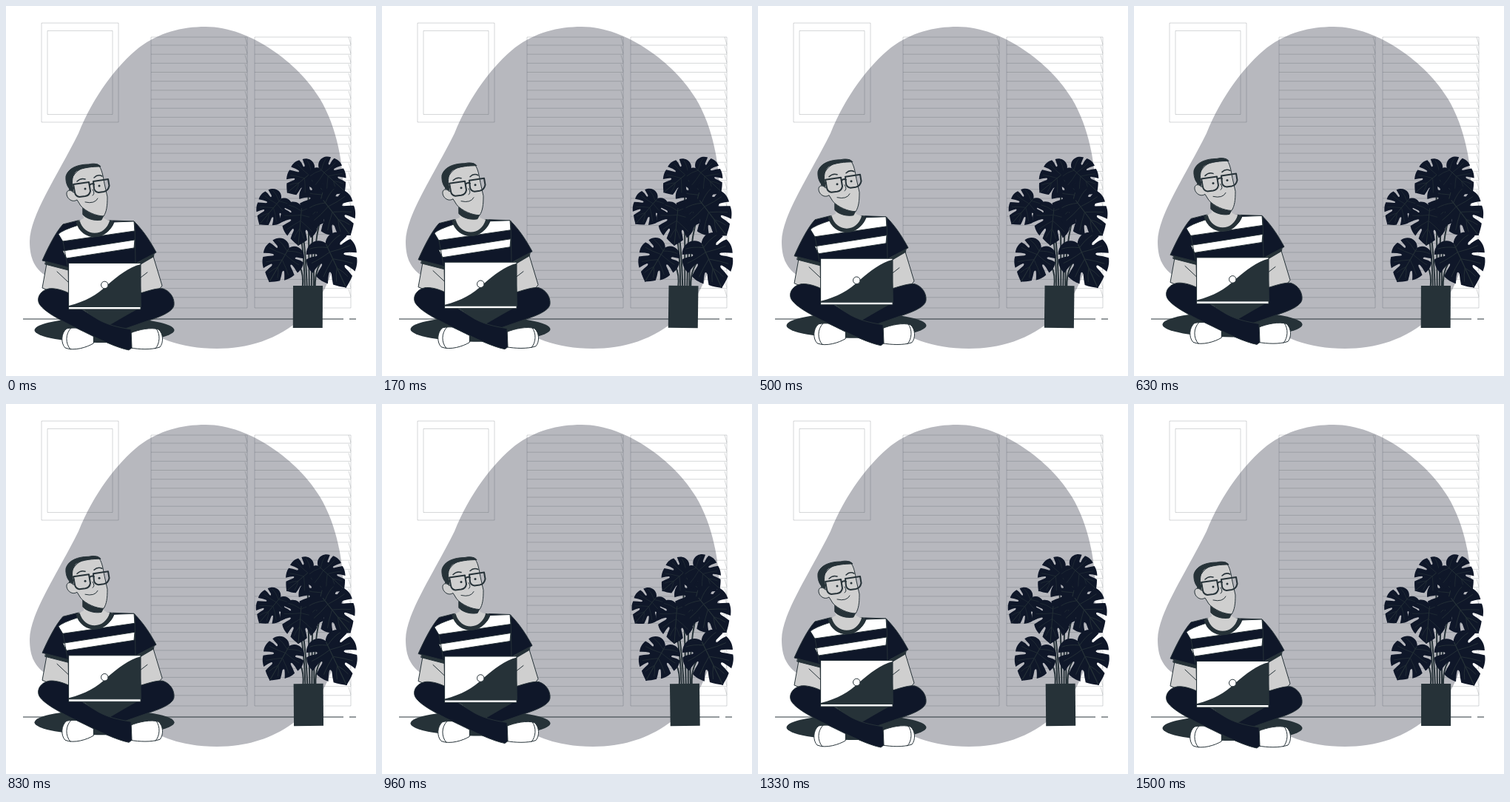
Write an HTML page that moves like this. It is 500 px wide and 500 px high and loops after 1.54 s.

```html
<!DOCTYPE html>
<html lang="en">
<head>
<meta charset="utf-8">
<title>Working at home</title>
<style>
  html, body { margin: 0; width: 100%; height: 100%; overflow: hidden; background: #fff; }
  svg { display: block; width: 100%; height: 100%; }
  .thin { fill: none; stroke: #263238; stroke-opacity: .19; }
  .navy { fill: #0f1729; }
  .dark { fill: #263238; }
  .skin { fill: #cfcfcf; }
  .white { fill: #fff; }
  .line { fill: none; }
  #man { stroke: #263238; stroke-linejoin: round; stroke-linecap: round; }
</style>
</head>
<body>
<svg viewBox="0 0 500 500">
  <defs>
    <g id="half">
      <path class="navy" d="M-1-24C6-40 28-40 36-22Q28-19 22-17Q18-13 23-13Q32-16 39-15C43-6 42 2 39 9Q29 3 22 1Q17 1 21 5Q29 10 36 16C34 24 29 30 24 35Q19 25 15 20Q12 18 12 23Q15 31 17 40C12 45 6 49 0 53H-1Z"/>
      <path d="M0-18Q15-27 27-28M0-10Q20-6 34-6M0 2Q15 12 26 22M0 18Q7 28 10 38" fill="none" stroke="#263238"/>
    </g>
    <g id="leaf">
      <use href="#half"/>
      <use href="#half" transform="scale(-1 1)"/>
      <path d="M0-24V51" stroke="#263238" stroke-width="1.5"/>
    </g>
  </defs>

  <path fill="#b7b8be" d="M270 28C330 28 396 78 424 125C448 165 456 215 456 255C456 330 438 387 403 419C367 452 325 463 285 463C235 463 200 448 170 425C130 395 100 385 60 368C38 357 32 340 32 318C33 282 68 232 98 172C118 122 150 80 180 56C207 36 237 28 270 28Z"/>
  <path class="thin" d="M48 23H152V157H48ZM56 33.500H144V146.500H56Z"/>
  <path class="thin" id="blinds"/>
  <path d="M23 423H456M464 423H473" stroke="#263238" stroke-opacity=".65" stroke-width="1.4"/>

  <g id="plant">
    <path fill="none" stroke="#263238" stroke-width="2" d="M404 380Q403 330 396 300M407 380Q405 330 400 300M410 380Q409 330 408 235M413 380Q413 320 416 260M416 380Q415 330 424 290M418 380Q417 350 434 338M401 380Q404 345 380 340"/>
    <g id="leaves"></g>
    <path class="dark" d="M388.200 378H428.200V435H388.200Z"/>
  </g>

  <g id="man">
    <ellipse class="dark" stroke="none" cx="133" cy="438" rx="94.500" ry="17"/>
    <path class="skin" d="M55 348L49 381L86 396L86 350ZM198 335L211 378C206 386 195 389 182 388L180 348Z"/>
    <path class="line" d="M69 359L85 374M191 360L182 367"/>
    <path class="dark" d="M54 345L84 352V357L53 349ZM200 334L177 348V352L199 339Z"/>
    <path class="navy" d="M97 290L77 295C67 306 57 326 49 344L84 353L85 400H178L177 347L203 333C196 320 187 305 173 291L145 290Z"/>
    <path class="white" d="M71 308Q76 303 98 296C106 316 138 315 146 292L173 291L174 304L77 318ZM77 331L174 316L173 327L82 341Z"/>
    <path class="line" d="M77 318L83 351M174 292L175 347"/>
    <path class="skin" stroke="none" d="M104 264L105 287Q100 289 96 292C104 316 136 316 144 290Q134 290 131 285L130 270Z"/>
    <path class="line" stroke-width="5.500" stroke-linecap="butt" d="M97 291C104 316 136 316 143 290"/>
    <path class="dark" d="M104 273C112 281 122 284 132 283L129 289C119 291 108 287 104 282Z"/>

    <path class="skin" d="M88 236C92 222 108 214 124 214C130 220 131 230 133 240L137 258C137 270 136 278 132 284C122 284 108 278 101 270L96 262C90 266 83 261 82 255C81 249 87 247 91 252Z"/>
    <path class="dark" d="M90 250C85 249 80 240 81 230C84 219 97 214 112 214C119 212 126 214 128 217C118 217 104 218 95 223C89 229 89 237 90 244Z"/>
    <path class="line" stroke-width="2" d="M91 241L112 238L114 250Q113 256 107 257L99 258Q94 257 93 252ZM118 237L138 234L139.500 243Q138 250 132 251L125 252Q120 251 119 247ZM113 242Q116 239 119 241M92 245L86 248"/>
    <path class="line" stroke-width="1.500" d="M96 237Q101 232 107 234M119 232Q124 227 130 230"/>
    <path class="line" d="M107 265Q120 268 124 260M117 248Q121 254 117 256"/>
    <circle class="dark" stroke="none" cx="107" cy="247" r="1.500"/>
    <circle class="dark" stroke="none" cx="126" cy="243" r="1.500"/>

    <path class="dark" d="M85 395H185L180 412L138 436Z"/>
    <path class="white" d="M118 441C105 435 92 434 82 436C74 442 74 456 80 462C92 467 110 461 118 456ZM168 442C180 437 196 434 206 437C213 443 213 455 208 461C196 465 180 464 168 462Z"/>
    <path class="line" d="M88 435C80 443 80 456 87 464M203 436C209 444 208 456 202 463"/>
    <path class="navy" d="M182 388C195 384 205 381 212 382C222 385 228 395 227 404C226 414 205 421 190 426L130 447L108 436L138 432C150 425 165 416 182 407Z"/>
    <path class="navy" d="M85 388C75 383 64 381 58 382C48 384 42 392 44 400C47 412 80 428 105 440C125 450 150 462 166 465L170 462L169 437C150 434 138 431 125 424C110 415 100 408 85 398Z"/>

    <path class="white" d="M85 347.500H182V406H85Z"/>
    <path class="dark" stroke="none" d="M85 405C108 399 122 391 137 377C152 364 166 353 182 349V406H85Z"/>
    <path class="white" d="M85 406.500H182V410H85Z"/>
    <circle class="white" cx="133.300" cy="377" r="4.800"/>
  </g>
</svg>
<script>
  const LOOP = 1540;
  const byId = id => document.getElementById(id);

  // Two window blinds with evenly spaced slats
  let slats = '';
  for (const x of [196, 336]) {
    slats += `M${x} 42h130v366h-130Z`;
    for (let i = 0; i < 29; i++) {
      const y = 53 + i * 12.17;
      slats += `M${x} ${y}h130M${x + 127} ${y - 11}l3 10`;
    }
  }
  byId('blinds').setAttribute('d', slats);

  // x, y, rotation, scale
  const leaves = [
    [425, 262, 15, .72], [404, 232, 50, .6], [434, 229, -48, .6],
    [362, 272, 40, .58], [398, 289, 5, .66], [440, 277, -38, .78],
    [374, 342, 30, .68], [441, 340, -25, .84]
  ];
  byId('leaves').innerHTML = leaves.map(([x, y, turn, size]) =>
    `<use href="#leaf" transform="translate(${x} ${y}) rotate(${turn}) scale(${size})"/>`).join('');

  const angle = ms => ms / LOOP * 2 * Math.PI;

  function draw() {
    const t = performance.now() % LOOP;
    const lift = 4 - 4 * Math.cos(angle(t + 30));
    byId('man').setAttribute('transform', `translate(0 ${-lift})`);
    byId('plant').setAttribute('transform', `rotate(${.9 * Math.sin(angle(t + 60))} 407 322)`);
    requestAnimationFrame(draw);
  }
  draw();
</script>
</body>
</html>
```
